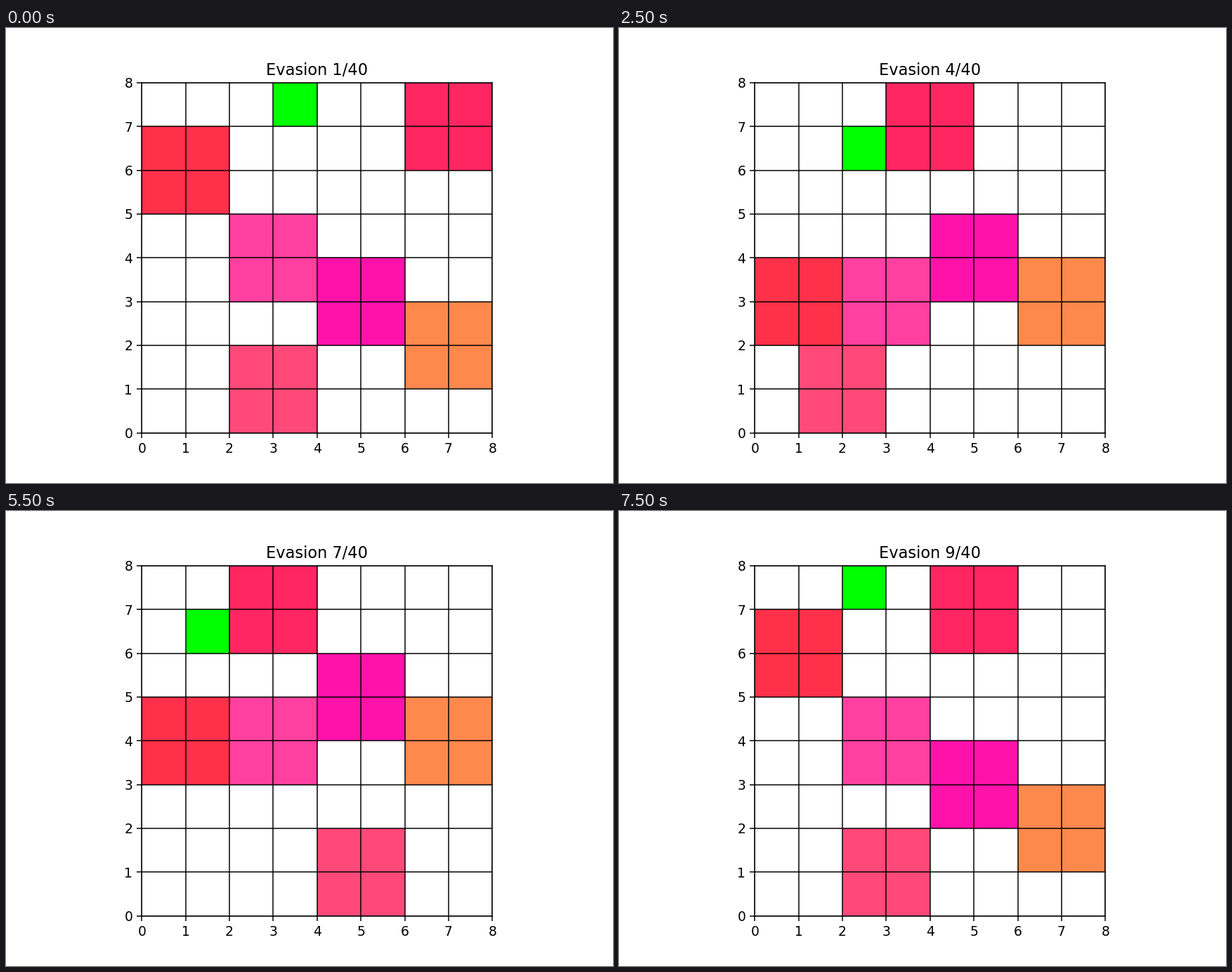
Recreate the animation shown at these times as a matplotlib script. Size 864 px wide and 648 px high, loop 8 s.

```python
import matplotlib.pyplot as plt
from matplotlib.animation import FuncAnimation
from matplotlib.patches import Rectangle

SIZE = 8
TURNS = 40
TICK_MS = 500
TICKS = 16

# Ticks at which a new turn begins: every block moves one cell.
TURN_STARTS = [0, 1, 2, 5, 7, 9, 10, 12, 14]

# The runner's cell from a given tick on.
RUNNER_PATH = {0: (3, 7), 3: (3, 6), 4: (2, 6), 6: (2, 5), 8: (1, 5),
               11: (1, 6), 13: (1, 7), 15: (2, 7)}

# colour, moving axis, fixed coordinate, lowest position, span, turn at lowest
BLOCKS = [
    ("#ff304a", "y", 0, 1, 4, 5),
    ("#ff2661", "x", 6, 1, 5, 6),
    ("#ff40a0", "y", 2, 2, 2, 4),
    ("#ff12aa", "y", 4, 2, 2, 1),
    ("#ff884c", "y", 6, 0, 4, 2),
    ("#ff4978", "x", 0, 0, 4, 3),
]


def bounce(turn, low, span, start):
    """Position of a block going back and forth one cell per turn."""
    return low + span - abs((turn - start) % (2 * span) - span)


def add_square(side, color):
    return ax.add_patch(Rectangle((0, 0), side, side, facecolor=color, linewidth=0))


fig, ax = plt.subplots(figsize=(6.4, 4.8), dpi=135)
ax.set(xlim=(0, SIZE), ylim=(0, SIZE), aspect="equal",
       xticks=range(SIZE + 1), yticks=range(SIZE + 1))
ax.grid(color="black", linewidth=0.8)
title = ax.set_title("")

squares = [add_square(2, block[0]) for block in BLOCKS]
runner = add_square(1, "#00ff00")


def update(tick):
    turn = sum(start <= tick for start in TURN_STARTS)
    title.set_text(f"Evasion {turn}/{TURNS}")
    for square, (_, axis, fixed, *track) in zip(squares, BLOCKS):
        pos = bounce(turn, *track)
        square.set_xy((pos, fixed) if axis == "x" else (fixed, pos))
    runner.set_xy(RUNNER_PATH[max(t for t in RUNNER_PATH if t <= tick)])
    return [*squares, runner, title]


anim = FuncAnimation(fig, update, frames=TICKS, interval=TICK_MS,
                     repeat=True, repeat_delay=0, blit=False)
plt.show()
```
